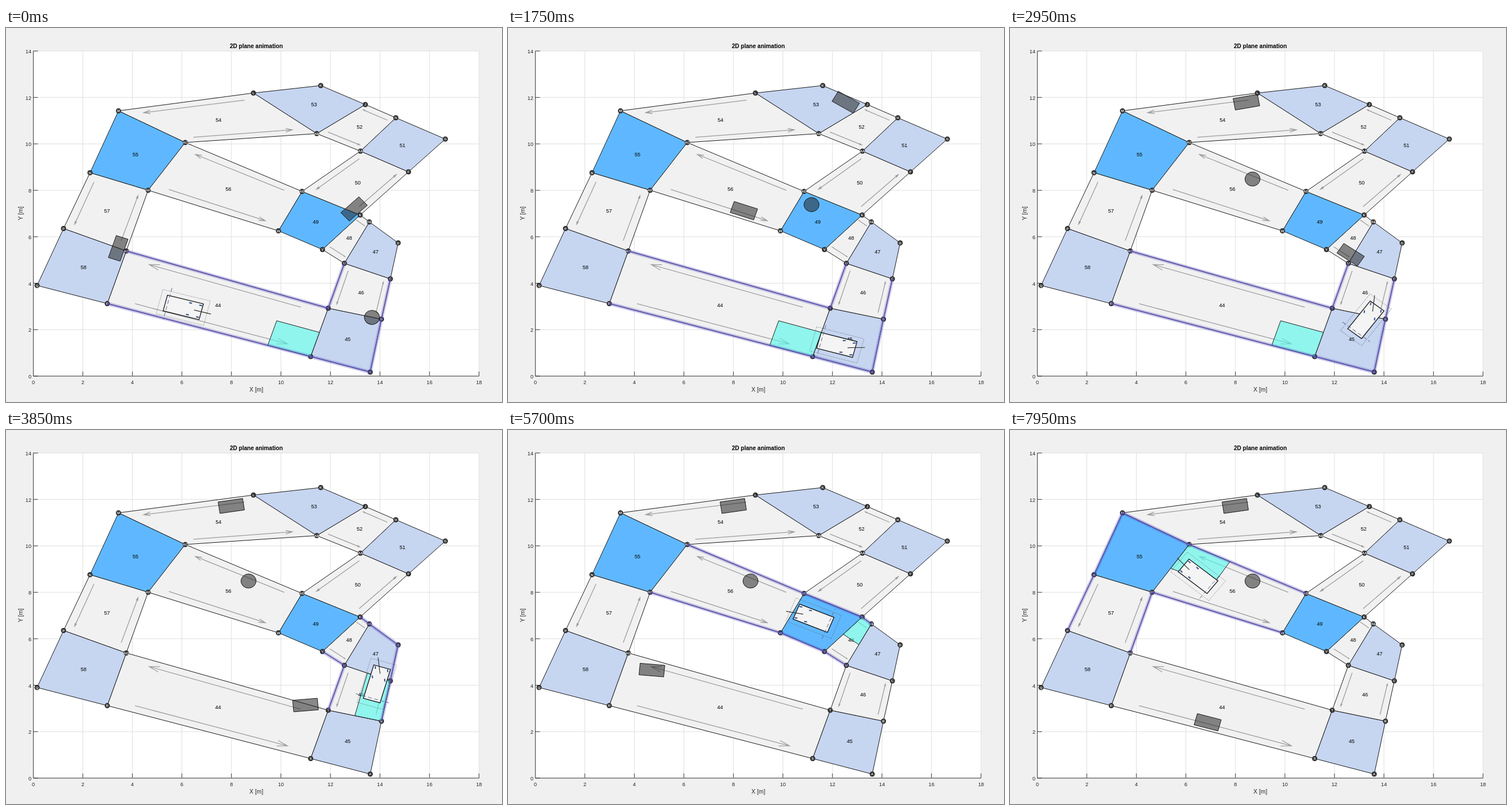
An HTML page for the animation above (8 s loop, 862 px wide and 650 px high).

```html
<!DOCTYPE html>
<html lang="en">
<head>
<meta charset="utf-8">
<title>2D plane animation</title>
<style>
  html, body { margin: 0; width: 100%; height: 100%; overflow: hidden; background: #f0f0f0; }
  svg { display: block; width: 862px; height: 650px; font-family: "Liberation Sans", Arial, sans-serif; }
  text { text-anchor: middle; font-size: 9.2px; fill: #262626; }
  .region { stroke: #1a1a1a; stroke-width: 1; stroke-linejoin: round; }
  .arrow { fill: none; stroke: #9c9c9c; stroke-width: 1.25; }
  .node text { font-size: 6px; font-weight: bold; fill: #eee; }
  .wall { fill: none; stroke: #5048b4; stroke-width: 1.4; stroke-opacity: .8; stroke-linejoin: round; }
  .glow { stroke-width: 6; stroke-opacity: .3; }
  .goal { fill: rgb(80,248,235); fill-opacity: .6; stroke: #222; stroke-width: 1; }
  .obstacle { fill: #1e1e1e; fill-opacity: .52; stroke: #1a1a1a; }
  .robot * { fill: none; }
  .moving * { vector-effect: non-scaling-stroke; }
</style>
</head>
<body>
<svg id="stage" viewBox="0 0 862 650"></svg>
<script>
const LOOP = 8000, STEP = 50;
const UX = 43.03, UY = 40.36, LEFT = 47.5, TOP = 40, RIGHT = 822, BOTTOM = 605;
const stage = document.getElementById('stage');

function add(parent, tag, attrs = {}, text) {
  const el = document.createElementNS('http://www.w3.org/2000/svg', tag);
  for (const key in attrs) el.setAttribute(key, attrs[key]);
  if (text !== undefined) el.textContent = text;
  parent.appendChild(el);
  return el;
}
const line = (parent, x1, y1, x2, y2, attrs) => add(parent, 'line', { x1, y1, x2, y2, ...attrs });
const box = (parent, x, w, h, attrs) =>
  add(parent, 'rect', { x: x - w / 2, y: -h / 2, width: w, height: h, ...attrs });
const lerp = (p, q, u) => p.map((v, i) => v + (q[i] - v) * u);

const nodes = {
  A: [633, 598], B: [652.5, 506], C: [668, 436], D: [681.5, 373.5], E: [615.5, 325],
  F: [699.5, 250], G: [763.5, 193], H: [677.5, 156], J: [624.5, 133], K: [547, 100],
  L: [430, 113], M: [195.5, 144], N: [146, 251.5], P: [100, 348.5], Q: [54, 447.5],
  R: [176, 479], S: [529.5, 571], T: [560, 487], U: [588, 409], V: [550, 385],
  W: [473.5, 352.5], AA: [616, 214], AB: [540, 183.5], AC: [311.5, 199],
  AD: [514.5, 284], AE: [631.5, 337], AF: [247, 282], AG: [209, 387.5]
};
const corners = names => names.split(' ').map(n => nodes[n]);

// Lanes list their corners so that traffic runs first-to-last and third-to-second.
const LANE = '#f1f1f1', PALE = '#c6d5f0', BLUE = '#5fb8ff', FIRST_ID = 44;
const regions = [
  ['R AG T S', LANE], ['S T B A', PALE], ['B T U C', LANE], ['U AE D C', PALE],
  ['V E AE U', LANE], ['W AD E V', BLUE], ['E AD AA F', LANE], ['AA H G F', PALE],
  ['AB J H AA', LANE], ['L K J AB', PALE], ['AC M L AB', LANE], ['N M AC AF', BLUE],
  ['AF AC AD W', LANE], ['AG P N AF', LANE], ['Q P AG R', PALE]
].map(([names, fill]) => ({ points: corners(names), fill }));

// Point at share s along a lane and share v across it.
const inLane = ([a, b, c, d], s, v) => lerp(lerp(a, d, s), lerp(b, c, s), v);

function drawAxes() {
  add(stage, 'rect', { width: 862, height: 650, fill: '#f0f0f0' });
  add(stage, 'rect', { x: LEFT, y: TOP, width: RIGHT - LEFT, height: BOTTOM - TOP, fill: '#fff' });
  const grid = { stroke: '#dfdfdf' }, dark = { stroke: '#3a3a3a' };
  for (let v = 0; v <= 18; v += 2) {
    const x = LEFT + v * UX;
    line(stage, x, TOP, x, BOTTOM, grid);
    line(stage, x, BOTTOM, x, BOTTOM - 8, dark);
    add(stage, 'text', { x, y: 618.5 }, v);
  }
  for (let v = 0; v <= 14; v += 2) {
    const y = BOTTOM - v * UY;
    line(stage, LEFT, y, RIGHT, y, grid);
    line(stage, LEFT, y, LEFT + 8, y, dark);
    add(stage, 'text', { x: 44, y: y + 4, style: 'text-anchor:end' }, v);
  }
  add(stage, 'path', { d: `M${LEFT} ${TOP}V${BOTTOM}H${RIGHT}`, fill: 'none', ...dark });
  add(stage, 'text', { x: 435, y: 34.5, style: 'font-size:10.05px;font-weight:bold;fill:#000' }, '2D plane animation');
  add(stage, 'text', { x: 435, y: 632, style: 'font-size:10.3px' }, 'X [m]');
  add(stage, 'text', { transform: 'translate(29 322) rotate(-90)', style: 'font-size:10.3px' }, 'Y [m]');
}

function drawArrow([x1, y1], [x2, y2]) {
  const bx = (x1 - x2) * .066, by = (y1 - y2) * .066, w = .27;
  add(stage, 'path', {
    class: 'arrow',
    d: `M${x1} ${y1}L${x2} ${y2}M${x2 + bx - by * w} ${y2 + by + bx * w}` +
       `L${x2} ${y2}L${x2 + bx + by * w} ${y2 + by - bx * w}`
  });
}

drawAxes();
for (const { points, fill } of regions)
  add(stage, 'polygon', { class: 'region', points: points.join(' '), fill });
regions.forEach(({ points, fill }, i) => {
  if (fill === LANE) {
    const near = 1 / 8, far = 7 / 8;
    drawArrow(inLane(points, near, near), inLane(points, far, near));
    drawArrow(inLane(points, far, far), inLane(points, near, far));
  }
  const [x, y] = inLane(points, .5, .5);
  add(stage, 'text', { x, y: y + 3.6, style: 'fill:#000' }, FIRST_ID + i);
});
for (const name in nodes) {
  const [x, y] = nodes[name];
  const g = add(stage, 'g', { class: 'node' });
  add(g, 'circle', { cx: x, cy: y, r: 4.5, fill: '#303030' });
  add(g, 'text', { x, y: y + 2.2 }, name);
}

// The goal fills half the lane over at most 1.8 m before its exit.
function goalArea(id, reverse) {
  const { points } = regions[id - FIRST_ID];
  const [from, to] = reverse ? [points[2], points[1]] : [points[0], points[3]];
  const share = Math.min(1, 1.8 / Math.hypot((to[0] - from[0]) / UX, (to[1] - from[1]) / UY));
  const [s0, s1] = reverse ? [0, share] : [1 - share, 1];
  const [v0, v1] = reverse ? [.5, 1] : [0, .5];
  return [[s0, v0], [s1, v0], [s1, v1], [s0, v1]].map(([s, v]) => inLane(points, s, v)).join(' ');
}

// Corridor walls and goal, each shown until the given time.
const corridors = [
  { until: 3050, walls: ['AG T U', 'R S A B C'], goal: goalArea(44) },
  { until: 4950, walls: ['T U V', 'B C D AE E'], goal: goalArea(46) },
  { until: 5900, walls: ['U V W AF', 'AE E AD AC'], goal: goalArea(48, true) },
  { until: LOOP, walls: ['W AF AG', 'AD AC M N P'], goal: goalArea(56, true) }
];
for (const corridor of corridors) {
  corridor.group = add(stage, 'g');
  add(corridor.group, 'polygon', { class: 'goal', points: corridor.goal });
  for (const wall of corridor.walls)
    for (const cls of ['wall glow', 'wall'])
      add(corridor.group, 'polyline', { class: cls, points: corners(wall).join(' ') });
}

// A route is a path of legs, each driven at even speed until its end time.
function mover(cls, start, legs) {
  const path = document.createElementNS('http://www.w3.org/2000/svg', 'path');
  const marks = [[0, 0]];
  let d = start;
  for (const [end, leg] of legs) {
    path.setAttribute('d', d += leg);
    marks.push([end, path.getTotalLength()]);
  }
  return { path, marks, el: add(stage, 'g', { class: 'moving ' + cls }) };
}

function distanceAt(marks, time) {
  const i = marks.findIndex(([end]) => end > time);
  if (i < 0) return marks[marks.length - 1][1];
  const [t0, s0] = marks[i - 1], [t1, s1] = marks[i];
  return s0 + (s1 - s0) * (time - t0) / (t1 - t0);
}

function headingAt(path, s) {
  const end = path.getTotalLength();
  const mid = Math.min(Math.max(s, 1), end - 1);
  const p = path.getPointAtLength(mid - 1), q = path.getPointAtLength(mid + 1);
  return Math.atan2((q.y - p.y) / UY, (q.x - p.x) / UX) * 180 / Math.PI;
}

const car = mover('obstacle', 'M605 314.5', [
  [750, 'L690 240'], [1750, 'C710 222 665 170 587 129'], [3080, 'C530 95 470 121 391.5 132']
]);
const van = mover('obstacle', 'M195 383', [
  [750, 'L236 268.5'], [1750, 'C243 248 260 271 410 317.5'], [2950, 'C480 340 545 365 592 394'],
  [4250, 'C635 421 575 502 458 472'], [4750, 'L387.5 452.5'],
  [6600, 'L270 421C195 400 185 467 270 489'], [7240, 'L343.5 508']
]);
const walker = mover('obstacle', 'M636 503', [
  [750, 'Q655 445 648 396'], [1750, 'C643 350 600 338 527.5 307'], [2500, 'L421.5 262.5']
]);
// The robot's route is that of its rear axle.
const robot = mover('robot', 'M281 479', [
  [750, 'L429.5 515'], [1750, 'L544.5 544'], [2950, 'Q581 553.5 601.6 528'],
  [4750, 'Q661 454 632.3 397'], [6600, 'Q601 334 466.2 315.3'], [7950, 'Q393.5 305 348.6 270.7']
]);
const movers = [car, van, walker, robot];

box(car.el, 0, 1, .5);
box(van.el, 0, 1, .5);
add(walker.el, 'circle', { r: .305 });

const CENTER = .65, FRONT = 1.1;
box(robot.el, CENTER, 1.5, .7, { style: 'fill:#f4f4f4', stroke: '#111', 'stroke-width': 1.3 });
box(robot.el, CENTER, 1.98, 1.08, { stroke: '#555', 'stroke-dasharray': '1 2' });
line(robot.el, 0, -.7, 0, .7, { stroke: '#5a6a94', 'stroke-dasharray': '7 4' });
const steered = [];
function addSteered(x, y, from, to, attrs) {
  steered.push({ x, y, el: line(robot.el, from, 0, to, 0, attrs) });
}
addSteered(FRONT, 0, 0, .7, { stroke: '#333', 'stroke-width': 1.2 });
for (const x of [-.21, .21])
  for (const y of [-.26, .26])
    addSteered(FRONT + x, y, -.06, .06, { stroke: '#34518f', 'stroke-width': 2 });

// Front wheels turn with the bend of the route.
function steering(s) {
  const reach = 6, gain = 4.3;
  const bend = headingAt(robot.path, s + reach) - headingAt(robot.path, s - reach);
  return gain * ((bend + 540) % 360 - 180);
}

function render(time) {
  for (const { path, marks, el } of movers) {
    const s = distanceAt(marks, time), { x, y } = path.getPointAtLength(s);
    el.setAttribute('transform', `translate(${x} ${y}) scale(${UX} ${UY}) rotate(${headingAt(path, s)})`);
  }
  const angle = steering(distanceAt(robot.marks, time));
  for (const { el, x, y } of steered)
    el.setAttribute('transform', `translate(${x} ${y}) rotate(${angle})`);
  const current = corridors.find(c => time < c.until);
  for (const c of corridors) c.group.style.display = c === current ? '' : 'none';
}

const start = performance.now();
function tick() {
  const t = (performance.now() - start) % LOOP;
  render(Math.floor(t / STEP) * STEP);
  requestAnimationFrame(tick);
}
tick();
</script>
</body>
</html>
```
